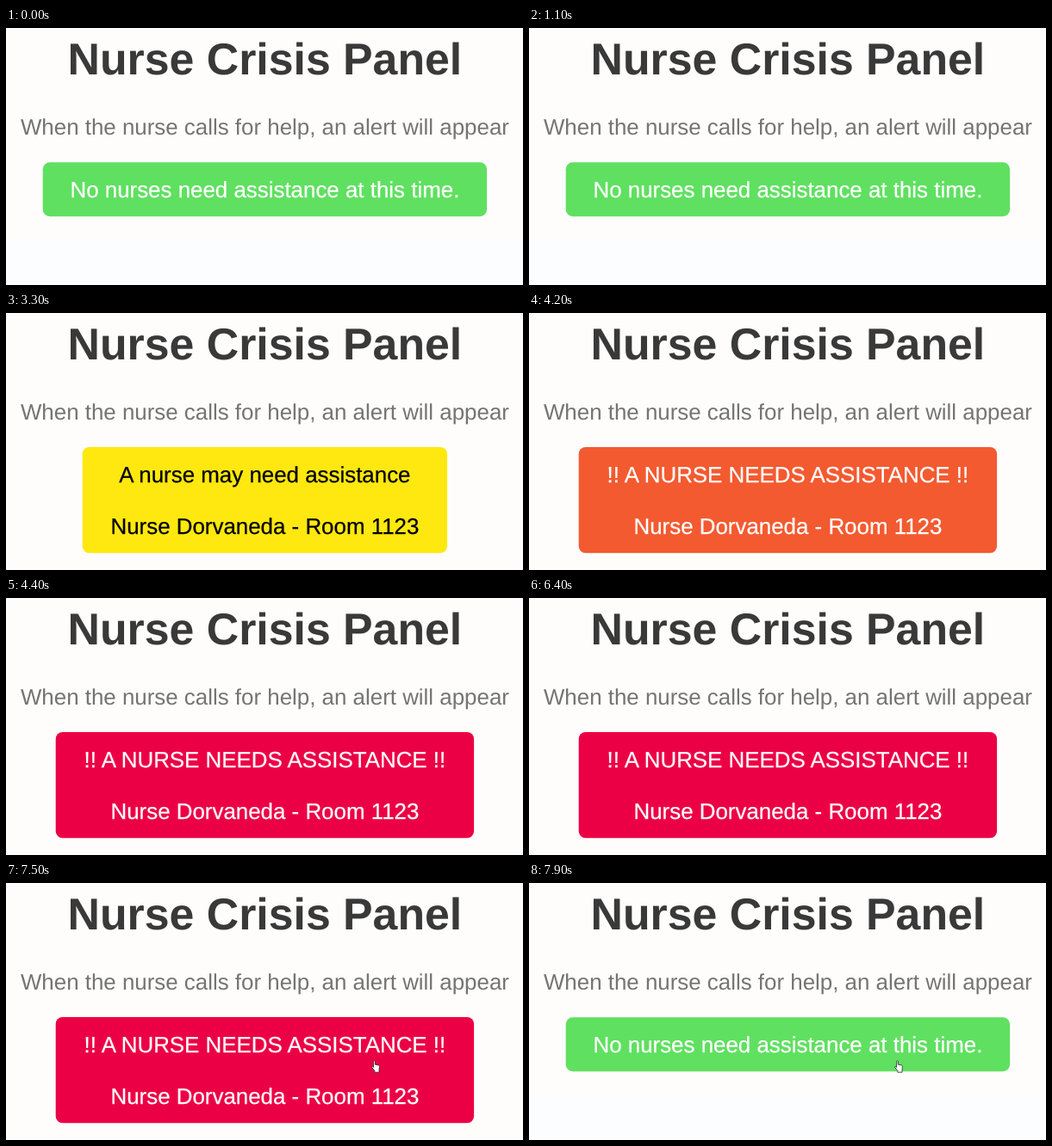
An HTML page that plays this animation: 600 px wide and 299 px high, repeating every 8.1 s.

```html
<!DOCTYPE html>
<html lang="en">
<head>
<meta charset="utf-8">
<title>Nurse Crisis Panel</title>
<style>
  :root {
    --loop: 8100ms;
    --green: #5fe060;
    --yellow: #ffe80f;
    --red: #ec0045;
  }
  html, body {
    margin: 0;
    width: 100%;
    height: 100%;
    overflow: hidden;
    background: #fefdfc;
  }
  svg { display: block; width: 100%; height: 100%; }
  text {
    font: 25.9px "Liberation Sans", Arial, sans-serif;
    text-anchor: middle;
    text-rendering: geometricPrecision;
  }
  .title { font-size: 51.8px; font-weight: bold; fill: #393939; }
  .lead { fill: #747474; }

  .state, .state rect, .cursor { animation: var(--loop) step-end infinite; }
  .state text { stroke-width: .25px; }
  .calm { fill: #fff; stroke: #fff; animation-name: show-calm; }
  .warn { fill: #000; stroke: #000; animation-name: show-warn; }
  .alarm { fill: #fff; stroke: #fff; animation-name: show-alarm; }
  .state rect { stroke: none; }
  .calm .box { fill: var(--green); animation-name: tint-calm; }
  .warn .box { fill: var(--yellow); animation-name: tint-warn; }
  .alarm .box { fill: var(--red); animation-name: tint-alarm; }
  .floor { fill: #fbfdff; }

  /* Warning at 2.2 s, alarm at 4.2 s, dismissed at 7.6 s */
  @keyframes show-calm {
    0% { visibility: visible; }
    27.16% { visibility: hidden; }
    93.82%, 100% { visibility: visible; }
  }
  @keyframes show-warn {
    0% { visibility: hidden; }
    27.16% { visibility: visible; }
    51.85%, 100% { visibility: hidden; }
  }
  @keyframes show-alarm {
    0% { visibility: hidden; }
    51.85% { visibility: visible; }
    93.82%, 100% { visibility: hidden; }
  }

  /* Brief blend with the previous colour */
  @keyframes tint-calm {
    0% { fill: var(--green); }
    93.82% { fill: #909257; }
    95.06%, 100% { fill: var(--green); }
  }
  @keyframes tint-warn {
    0% { fill: #c9d844; }
    28.39%, 100% { fill: var(--yellow); }
  }
  @keyframes tint-alarm {
    0% { fill: #f35a30; }
    53.08%, 100% { fill: var(--red); }
  }

  .cursor { animation-name: show-cursor, move-cursor; }
  @keyframes show-cursor {
    0% { visibility: hidden; }
    81.48%, 100% { visibility: visible; }
  }
  @keyframes move-cursor {
    0% { transform: translate(571px, 149px); }
    81.48% { transform: translate(571px, 149px); animation-timing-function: ease-out; }
    86.42%, 100% { transform: translate(424px, 206px); }
  }
</style>
</head>
<body>
<svg viewBox="0 0 600 299">
  <g class="state calm">
    <rect class="floor" y="248" width="600" height="51"/>
    <rect class="box" x="42.7" y="156.3" width="515.4" height="62.9" rx="8"/>
    <text x="300.4" y="196.5">No nurses need assistance at this time.</text>
  </g>
  <g class="state warn">
    <rect class="box" x="88.7" y="156" width="423.4" height="123.3" rx="8"/>
    <text x="300.4" y="196.5">A nurse may need assistance</text>
    <text x="300.4" y="256.5">Nurse Dorvaneda - Room 1123</text>
  </g>
  <g class="state alarm">
    <rect class="box" x="57.7" y="156" width="485.4" height="123.3" rx="8"/>
    <text x="300.4" y="196.5">!! A NURSE NEEDS ASSISTANCE !!</text>
    <text x="300.4" y="256.5">Nurse Dorvaneda - Room 1123</text>
  </g>

  <text class="title" x="300.4" y="54">Nurse Crisis Panel</text>
  <text class="lead" x="300.4" y="124">When the nurse calls for help, an alert will appear</text>

  <g class="cursor">
    <path fill="#fff" stroke="#222" stroke-width=".8" stroke-linejoin="round"
      d="M2.6 1.4q.9-1.2 1.8 0V5.2l4 .8q1.1.3 1 1.4L9 11.4V14.2H3.8V12.4L.7 8.6Q.3 7.4 1.4 7.5l1.2 1z"/>
  </g>
</svg>
</body>
</html>
```
